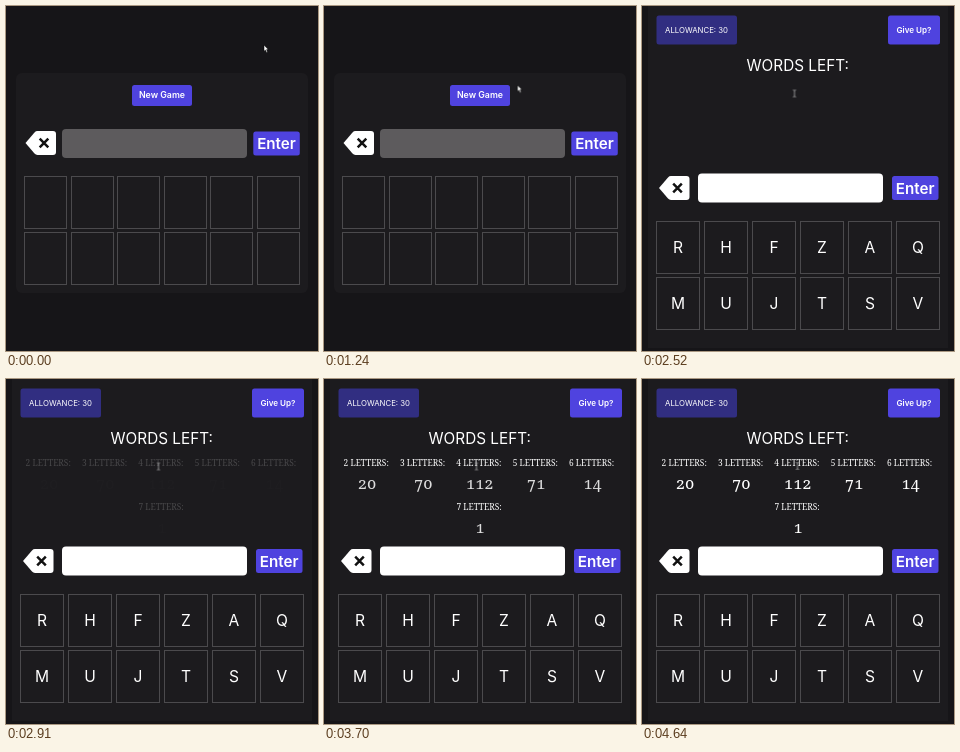
An HTML page that plays this animation: 312 by 345 pixels, repeating every 4.67 s.

```html
<!DOCTYPE html>
<html lang="en">
<head>
<meta charset="utf-8">
<title>Word game</title>
<style>
  html, body { margin: 0; width: 100%; height: 100%; overflow: hidden; background: #161518; }
  svg { display: block; width: 100vw; height: 100vh; }
  text { font-family: Inter, "Liberation Sans", sans-serif; fill: #fff; text-anchor: middle; }
  .panel { fill: #1c1b1e; }
  .tile { fill: none; stroke: #4b4a4d; }
  .indigo { fill: #4f43df; }
  .bold { font-weight: 600; }
  .label { font: 8.4px "Noto Serif", serif; }
  .count { font: 16px "Noto Serif", serif; font-variant-numeric: oldstyle-nums; }

  .lobby, .game, .hover, .arrow, .hand, .beam, .labels, .counts, .cursor {
    animation: 4670ms linear infinite;
  }
  .lobby { animation-name: lobby; }
  .game { animation-name: game; }
  .hover { animation-name: hover; }
  .arrow { animation-name: arrow; }
  .hand { animation-name: hand; }
  .beam { animation-name: game; }
  .labels { animation-name: labels; }
  .counts { animation-name: counts; }
  .cursor { animation-name: travel; }

  @keyframes lobby {
    0%, 47.95% { visibility: visible; }
    47.96%, 100% { visibility: hidden; }
  }
  @keyframes game {
    0%, 47.95% { visibility: hidden; }
    47.96%, 100% { visibility: visible; }
  }
  @keyframes hover {
    0%, 28.9% { opacity: 0; transform: translateY(1px); }
    31.5%, 100% { opacity: 1; transform: none; }
  }
  @keyframes arrow {
    0%, 28.9% { visibility: visible; }
    28.91%, 100% { visibility: hidden; }
  }
  @keyframes hand {
    0%, 28.9% { visibility: hidden; }
    28.91%, 47.95% { visibility: visible; }
    47.96%, 100% { visibility: hidden; }
  }
  @keyframes labels {
    0%, 59.74% { opacity: 0; animation-timing-function: ease-in-out; }
    68.3%, 100% { opacity: 1; }
  }
  @keyframes counts {
    0%, 60.38% { opacity: 0; animation-timing-function: ease-in-out; }
    86.08%, 100% { opacity: 1; }
  }
  @keyframes travel {
    0% { transform: translate(258px, 39px); }
    12.1% { transform: translate(243px, 49px); }
    17.56% { transform: translate(221px, 68px); }
    23.66% { transform: translate(203px, 77px); }
    28.9% { transform: translate(186px, 81px); }
    35.1% { transform: translate(168px, 86px); }
    40.26% { transform: translate(153px, 87.5px); }
    44.1%, 92% { transform: translate(152.5px, 87.5px); }
    99.3%, 100% { transform: translate(155.5px, 87px); }
  }
</style>
</head>
<body>
<svg viewBox="0 0 312 345" preserveAspectRatio="none">
  <defs>
    <g id="erase">
      <path d="M0 12 L9 1.4 Q10.2 0 12 0 H27.5 Q30.5 0 30.5 3 V21 Q30.5 24 27.5 24 H12 Q10.2 24 9 22.6 Z" fill="#fff"/>
      <path d="M14.2 7.7 l8.6 8.6 m0 -8.6 l-8.6 8.6" stroke="#111" stroke-width="2.5"/>
    </g>
    <g id="enter">
      <rect class="indigo" width="46.5" height="24" rx="2.5"/>
      <text class="bold" x="23.2" y="17.6" font-size="15.2">Enter</text>
    </g>
  </defs>

  <g class="lobby">
    <rect class="panel" x="10" y="67" width="292" height="220" rx="6"/>
    <rect class="indigo" x="126" y="79" width="60" height="21" rx="2.5"/>
    <text class="bold" x="156" y="92.3" font-size="8.8">New Game</text>
    <g class="hover">
      <rect class="panel" x="125" y="77" width="62" height="24"/>
      <rect x="126" y="78" width="60" height="21" rx="2.5" fill="#fff"/>
      <text class="bold" x="156" y="91.3" font-size="8.8" style="fill:#312e81">New Game</text>
    </g>
    <use href="#erase" x="19.5" y="125"/>
    <rect x="56" y="123" width="185" height="29" rx="4" fill="#5d5b5d"/>
    <use href="#enter" x="247.3" y="125.5"/>
    <g id="slots"></g>
  </g>

  <g class="game">
    <rect class="panel" x="6" width="300" height="342"/>
    <rect x="14.5" y="9.5" width="80.5" height="29" rx="2.5" fill="#312e81"/>
    <text x="54.5" y="26.6" font-size="7.8">ALLOWANCE: 30</text>
    <rect class="indigo" x="246" y="9.5" width="52" height="29" rx="2.5"/>
    <text class="bold" x="272" y="26.6" font-size="8.1">Give Up?</text>
    <text x="155.7" y="64.5" font-size="15.3">WORDS LEFT:</text>
    <g class="labels" id="labels"></g>
    <g class="counts" id="counts"></g>
    <use href="#erase" x="17" y="170"/>
    <rect x="56" y="167.5" width="185" height="29" rx="4" fill="#fff"/>
    <use href="#enter" x="250" y="170"/>
    <g id="letters"></g>
  </g>

  <g class="cursor">
    <path class="arrow" d="M0 0 V6.2 L1.4 5 L2.5 7.4 L3.6 6.9 L2.6 4.6 H4.4 Z" fill="#fff" stroke="#000" stroke-width=".5"/>
    <path class="hand" d="M-1 0.8 Q0 -.8 1 .8 V3.2 Q2 2.3 2.7 3.4 Q3.7 2.7 4.3 3.8 Q5.6 3.3 5.7 4.8 V6.3 L4.8 9 H0 L-2.9 5.6 Q-3 4.1 -1 5.2 Z" fill="#fff" stroke="#222" stroke-width=".8"/>
    <path class="beam" d="M-1.5 -3.5 Q0 -3.5 0 -2.5 Q0 -3.5 1.5 -3.5 M0 -2.5 V2.5 M-1.5 3.5 Q0 3.5 0 2.5 Q0 3.5 1.5 3.5" fill="none" stroke="#aaa" stroke-width=".8"/>
  </g>
</svg>
<script>
  const NS = "http://www.w3.org/2000/svg";
  function add(parent, tag, attrs, text = "") {
    const el = document.createElementNS(NS, tag);
    for (const key in attrs) el.setAttribute(key, attrs[key]);
    el.textContent = text;
    document.getElementById(parent).append(el);
  }

  function board(parent, x0, y0, pitch, width, letters = "") {
    for (let i = 0; i < 12; i++) {
      const x = Math.round(x0 + (i % 6) * pitch) + 0.5;
      const y = y0 + (i < 6 ? 0 : 56);
      add(parent, "rect", { class: "tile", x, y, width, height: 52 });
      if (letters) add(parent, "text", { x: x + width / 2, y: y + 31.8, "font-size": 15.6 }, letters[i]);
    }
  }
  board("slots", 18, 170.5, 46.55, 42);
  board("letters", 14, 215.5, 47.9, 43, "RHFZAQMUJTSV");

  [20, 70, 112, 71, 14, 1].forEach((count, i) => {
    const last = i === 5;
    const x = last ? 155 : 42.2 + i * 56.35;
    const y = last ? 131 : 87;
    add("labels", "text", { class: "label", x, y }, `${i + 2} LETTERS:`);
    add("counts", "text", { class: "count", x: x + 0.8, y: y + 22.5 }, count);
  });
</script>
</body>
</html>
```
